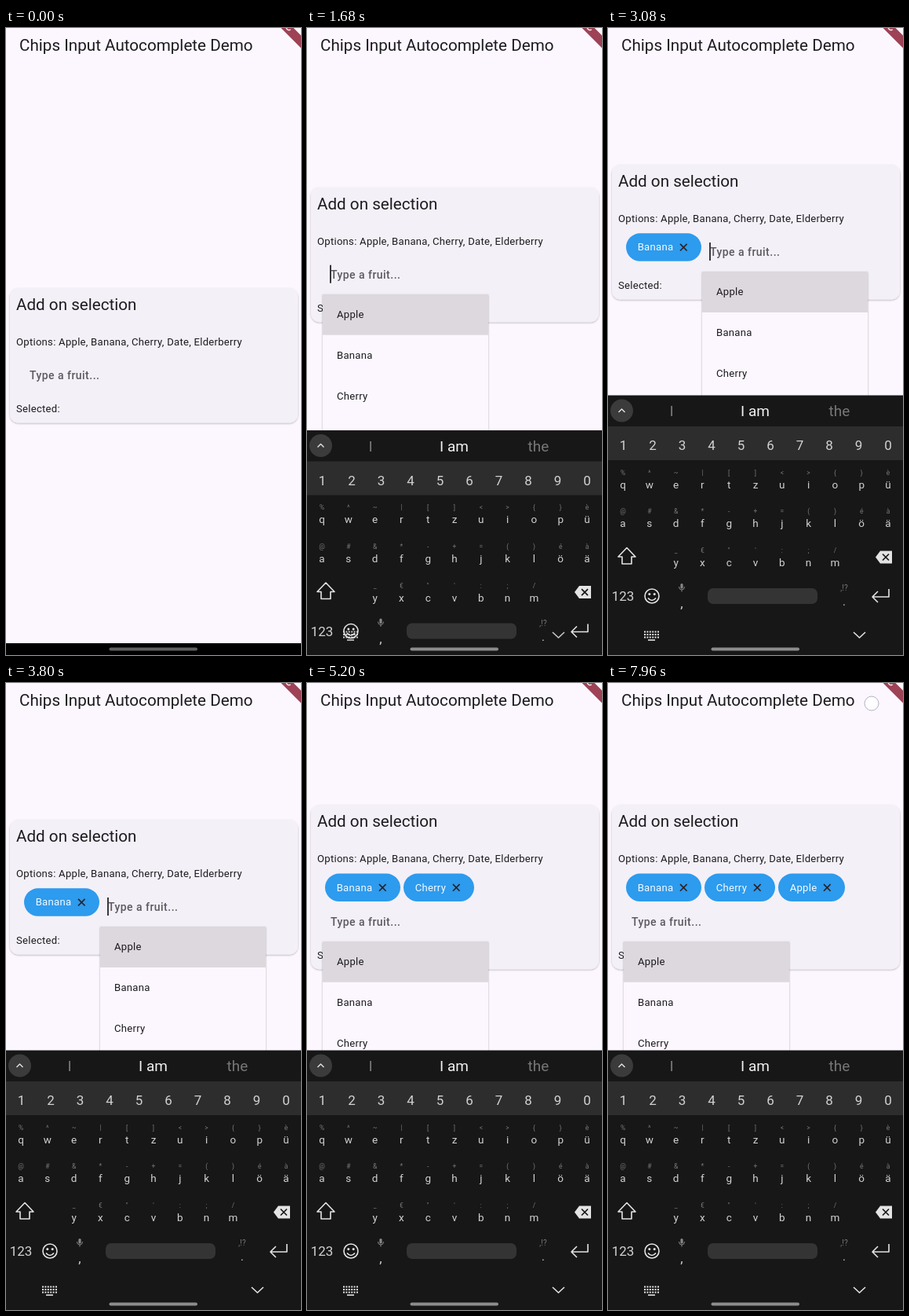
Animation, 376 px wide and 798 px high, one loop 8 s. Source, as an HTML page:

```html
<!DOCTYPE html>
<html lang="en">
<head>
<meta charset="utf-8">
<title>Chips input</title>
<style>
html, body { margin: 0; width: 100%; height: 100%; overflow: hidden; background: #fcf7fe; }
svg { display: block; width: 100vw; height: 100vh; }
text { font-family: Roboto, sans-serif; fill: #1d1b20; white-space: pre; }
.title { font-size: 20.65px; }
.body { font-size: 13.13px; letter-spacing: .25px; }
.keys text { text-anchor: middle; fill: #d2d2d2; }
.keys .hint { font-size: 8.5px; fill: #777; }
.line { fill: none; stroke: #e4e4e4; stroke-width: 1.6; stroke-linejoin: round; }
</style>
</head>
<body>
<svg viewBox="0 0 376 798" preserveAspectRatio="none">
  <defs>
    <filter id="soft" x="-10%" y="-10%" width="120%" height="125%">
      <feDropShadow dx="0" dy="1" stdDeviation=".8" flood-color="#000" flood-opacity=".28"/>
    </filter>
    <filter id="lift" x="-10%" y="-10%" width="120%" height="125%">
      <feDropShadow dx="0" dy="1" stdDeviation="1.3" flood-color="#000" flood-opacity=".32"/>
    </filter>
  </defs>
  <rect width="376" height="798" fill="#fcf7fe"/>
  <text class="title" x="17" y="29">Chips Input Autocomplete Demo</text>
  <path d="M350.5 0H366.5L376 9.5V25.5Z" fill="#9e4256"/>
  <path d="M357 0l2 2.2q2 1.4 3.6-.4" fill="none" stroke="#f4e4ea" stroke-width="1.5"/>

  <g id="card">
    <rect id="panel" x="5" width="367" height="171.5" rx="11" fill="#f4f0f7" filter="url(#soft)"/>
    <text class="title" x="13" y="28">Add on selection</text>
    <text class="body" x="13" y="73">Options: Apple, Banana, Cherry, Date, Elderberry</text>
    <g id="chips"></g>
    <text id="selected" class="body" x="13" y="158">Selected:</text>
    <g id="field">
      <text x="30" y="116" font-size="14" font-weight="500" letter-spacing=".47" style="fill:#5d5961">Type a fruit...</text>
      <rect id="cursor" x="29" y="99" width="2" height="23" fill="#3b373e"/>
      <g id="menu">
        <rect x="20" y="136" width="211" height="183" fill="#fcf7fe" filter="url(#lift)"/>
        <rect x="20" y="136" width="211" height="52" fill="#ddd8de"/>
      </g>
    </g>
  </g>

  <rect y="783" width="376" height="15" fill="#000"/>
  <g id="keyboard" class="keys">
    <rect y="467.5" width="376" height="340" fill="#171717"/>
    <rect y="507" width="376" height="43" fill="#2d2d2d"/>
    <circle cx="17.5" cy="487" r="14.5" fill="#3b3b3b"/>
    <path class="line" d="M13.5 489l4-4 4 4" style="stroke-width:1.4"/>
    <g font-size="19">
      <text x="81" y="494" style="fill:#777">I</text>
      <text x="187.5" y="494" style="fill:#f2f2f2">I am</text>
      <text x="295" y="494" style="fill:#777">the</text>
    </g>
    <g id="caps"></g>
    <path class="line" d="M24 661.5L35 673H30V682H18V673H13Z"/>
    <path d="M341 673.5l6-8h15v16h-15Z" fill="#e4e4e4"/>
    <path d="M350 669.5l8 8m0-8l-8 8" stroke="#171717" stroke-width="1.7"/>
    <text x="19" y="729" font-size="17">123</text>
    <circle class="line" cx="56" cy="723" r="9"/>
    <path class="line" d="M51 725.5q5 6 10 0"/>
    <circle cx="52.8" cy="720.5" r="1.5" fill="#e4e4e4"/>
    <circle cx="59.2" cy="720.5" r="1.5" fill="#e4e4e4"/>
    <rect x="92.4" y="707" width="3.2" height="6.5" rx="1.6" fill="#888"/>
    <path d="M90.5 711q0 4 3.5 4t3.5-4M94 715v2.5" fill="none" stroke="#888"/>
    <text x="94" y="738" font-size="17">,</text>
    <rect x="127" y="713" width="140" height="20" rx="7" fill="#343434"/>
    <text class="hint" x="301" y="716" style="font-size:10px">,!?</text>
    <text x="301" y="735" font-size="15">.</text>
    <path class="line" d="M358 714V724H338M344 717l-7 7 7 7"/>
  </g>
  <g id="nav">
    <path class="line" d="M313 769l7.5 7 7.5-7"/>
    <path d="M46 768.5H65M46 772H65M46 775.5H65" stroke="#e4e4e4" stroke-width="2" stroke-dasharray="2 1.4"/>
    <path d="M51 779H60" stroke="#e4e4e4" stroke-width="1.6"/>
  </g>
  <rect id="pill" x="131.5" y="788.5" width="112.5" height="4" rx="2"/>
  <circle id="touch" r="9" fill="#fff" fill-opacity=".75" stroke="#b5b3c2"/>
</svg>
<script>
const LOOP = 8000;
const $ = id => document.getElementById(id);

function add(parent, tag, attrs, text) {
  const el = document.createElementNS('http://www.w3.org/2000/svg', tag);
  for (const k in attrs) el.setAttribute(k, attrs[k]);
  if (text) el.textContent = text;
  parent.appendChild(el);
  return el;
}
const show = (el, on) => el.setAttribute('display', on ? 'inline' : 'none');
const move = (el, x, y) => el.setAttribute('transform', `translate(${x} ${y})`);

['Apple', 'Banana', 'Cherry'].forEach((name, i) =>
  add($('menu'), 'text', { class: 'body', x: 38, y: 166 + 52 * i }, name));

// label, left edge, width, time added
const chips = [['Banana', 23, 96, 2960], ['Cherry', 123, 90, 4280], ['Apple', 217, 85, 5960]]
  .map(([name, x, w, at]) => {
    const el = add($('chips'), 'g', { transform: `translate(${x} 87.3)` });
    add(el, 'rect', { width: w, height: 35.5, rx: 17.75, fill: '#2d9bee' });
    add(el, 'text', { class: 'body', x: 14.7, y: 22, style: 'fill:#f5faff' }, name);
    add(el, 'path', {
      d: `M${w - 27} 13.6l8.6 8.6m0-8.6l-8.6 8.6`, stroke: '#2b2226', 'stroke-width': 1.7
    });
    return { el, at };
  });

function keyRow(keys, x, step, y, size, hints) {
  [...keys].forEach((key, i) => {
    const cx = x + step * i;
    add($('caps'), 'text', { x: cx, y, 'font-size': size }, key);
    if (hints) add($('caps'), 'text', { class: 'hint', x: cx, y: y - 17 }, hints[i]);
  });
}
keyRow('1234567890', 19.5, 37.5, 537, 17);
keyRow('qwertzuiopü', 19, 33.8, 585.5, 13.5, '%^~|[]<>{}è');
keyRow('asdfghjklöä', 19, 33.8, 635, 13.5, '@#&*-+=()éà');
keyRow('yxcvbnm', 86.6, 33.8, 685, 13.5, '_€"\':;/');

const cursorOn = [[1400, 2360], [2860, 3300], [3800, 4280], [4720, 5200], [5720, 6540], [6880, 7400]];
const taps = [[1160, 78, 442], [2720, 78, 388], [4040, 176, 440], [5720, 72, 355], [7940, 336, 26]];

// keyboard progress, 0 hidden to 1 open
function opened(t) {
  const p = Math.min(1, Math.max(0, (t - 1486) / 400));
  return 1 - (1 - p) ** 3;
}

function draw(t) {
  const open = opened(t);
  const count = chips.filter(c => t >= c.at).length;
  const extra = count > 1 ? 37.5 : 0;

  // the card trails the keyboard slightly
  move($('card'), 0, 331 - 157 * opened(t - 22) - extra / 2);
  $('panel').setAttribute('height', 171.5 + extra);
  move($('selected'), 0, extra);
  move($('field'), count === 1 ? 100 : 0, extra);
  chips.forEach(c => show(c.el, t >= c.at));
  show($('menu'), t >= 1400);
  show($('cursor'), cursorOn.some(([a, b]) => t >= a && t < b));

  show($('keyboard'), open > 0);
  move($('keyboard'), 0, 331 * (1 - open));
  $('nav').setAttribute('opacity', open);
  $('pill').setAttribute('fill', open > 0 ? '#8c8c8c' : '#606060');

  const tap = taps.find(([at]) => t >= at && t < at + 120);
  show($('touch'), tap);
  if (tap) move($('touch'), tap[1], tap[2]);
}

const start = performance.now();
function tick() {
  draw((performance.now() - start) % LOOP);
  requestAnimationFrame(tick);
}
tick();
</script>
</body>
</html>
```
